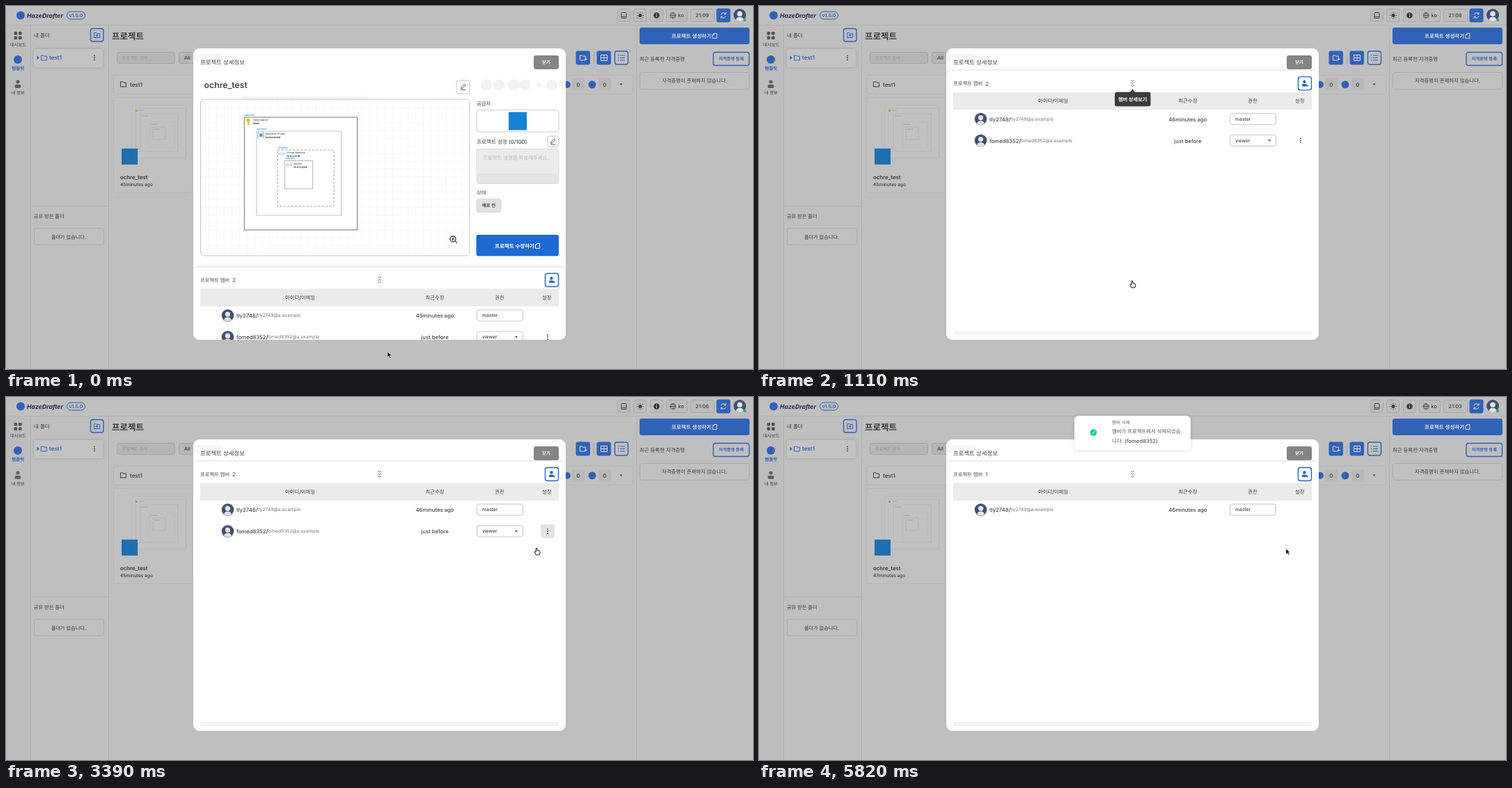
Recreate the animation shown at these times as an HTML page. Size 1073x522 px, loop 5.85 s.

```html
<!DOCTYPE html>
<html lang="ko">
<head>
<meta charset="utf-8">
<title>Project members</title>
<style>
html, body { margin: 0; width: 100%; height: 100%; overflow: hidden; background: #bfbfbf; }
svg { display: block; font-family: Inter, "Noto Sans CJK KR", "Noto Sans CJK", sans-serif; text-rendering: geometricPrecision; }
</style>
</head>
<body>
<svg id="stage" width="1073" height="522" viewBox="0 0 1073 522"></svg>
<script>
const LOOP = 5850;
const BLUE = '#1e69d2', EDGE_BLUE = '#2463bf', DIM_BLUE = '#3062b8', INK = '#444', DIM_INK = '#3a3a3a', LINE = '#a9a9a9';
const HANDLE = 'fomed8352';

const $ = id => document.getElementById(id);
const rect = (x, y, w, h, fill = 'none', stroke = 'none', r = 0, extra = '') =>
  `<rect x="${x}" y="${y}" width="${w}" height="${h}" rx="${r}" fill="${fill}" stroke="${stroke}" ${extra}/>`;
const circle = (x, y, r, fill, extra = '') => `<circle cx="${x}" cy="${y}" r="${r}" fill="${fill}" ${extra}/>`;
const line = (d, stroke, width = 1, extra = '') =>
  `<path d="${d}" fill="none" stroke="${stroke}" stroke-width="${width}" ${extra}/>`;
// y is the vertical centre of the text
const text = (x, y, s, size, fill = INK, weight = 500, extra = '') =>
  `<text x="${x}" y="${y + size * .36}" font-size="${size}" fill="${fill}" font-weight="${weight}" ${extra}>${s}</text>`;
const mid = (x, y, s, size, fill, weight, extra = '') =>
  text(x, y, s, size, fill, weight, 'text-anchor="middle" ' + extra);
const group = (id, body, extra = '') => `<g id="${id}" ${extra}>${body}</g>`;
const at = (x, y, body) => `<g transform="translate(${x} ${y})">${body}</g>`;

const folder = (x, y, c) => at(x, y, line('M-4-3.5H-1L0-2.3H4V3.5H-4Z', c));
const dots = (x, y, c) => [-3, 0, 3].map(d => circle(x, y + d, .9, c)).join('');
const pencil = (x, y) => at(x, y, line('M-3 3L-2.4.8L2-3.5L3.6-2L-.8 2.4ZM-3.5 4.6H4', '#444', .9));
const caret = (x, y, c) => `<path d="M${x - 2} ${y - 1}h4l-2 2.4z" fill="${c}"/>`;
const doc = (x, y, c) => at(x, y, line('M-1-3.5H3V3.5H-3V-1.5ZM-3-1.5H-1V-3.5', c));
const avatar = (x, y, r) => at(x, y, circle(0, 0, r, '#43516f') + circle(0, -r * .2, r * .42, '#dfe3ea')
  + `<path d="M${-r * .62} ${r * .78}Q${-r * .5} ${r * .3} 0 ${r * .3}T${r * .62} ${r * .78}Q0 ${r * 1.2} ${-r * .62} ${r * .78}Z" fill="#dfe3ea"/>`);

function topBar() {
  const box = (x, w) => rect(x + .5, 4.5, w, 18, '#bcbcbc', '#a6a6a6', 3);
  return line('M0 27.5H1073', '#b2b2b2')
    + circle(21, 13.5, 6, DIM_BLUE)
    + text(30, 13.5, 'HazeDrafter', 8.7, '#20304f', 700, 'font-style="italic"')
    + rect(87.5, 8, 26, 11, 'none', DIM_BLUE, 5.5) + mid(100.5, 13.5, 'v1.5.0', 7, DIM_BLUE, 600)
    + box(878, 18) + box(901, 18) + box(925, 18) + box(948, 30) + box(983, 34)
    + rect(884, 9.5, 7, 8, 'none', DIM_INK, 1) + line('M884 15.3H891', DIM_INK)
    + circle(911, 13.5, 2.5, DIM_INK)
    + line('M911 8.7V10M911 17V18.3M906.2 13.5H907.5M914.5 13.5H915.8M907.6 10.1l.9.9M913.5 16l.9.9M907.6 16.9l.9-.9M913.5 11l.9-.9', DIM_INK)
    + circle(934.5, 13.5, 4.3, DIM_INK) + line('M934.5 13V16M934.5 10.8V12', '#ccc')
    + circle(958, 13.5, 4, 'none', `stroke="${DIM_INK}" stroke-width=".8"`)
    + line('M954 13.5H962M958 9.5Q954.5 13.5 958 17.5Q961.5 13.5 958 9.5', DIM_INK, .7)
    + text(965.5, 13.5, 'ko', 7.3, DIM_INK) + mid(1000, 13.5, '', 7.4, DIM_INK, 500, 'id="clock"')
    + rect(1020.5, 3.5, 20, 20, DIM_BLUE, 'none', 3)
    + line('M1027 12.5A3.7 3.7 0 0 1 1033.7 11.5M1034 14.5A3.7 3.7 0 0 1 1027.3 15.5M1034 9V11.8H1031.4M1027 18V15.2H1029.6', '#ddd')
    + avatar(1054, 13, 9) + circle(1061, 20, 2.2, '#2fae87');
}

function sidePanels() {
  const tile = (x, y) => rect(x, y, 4.6, 4.6, '#505050', 'none', 1);
  return rect(0, 28, 35, 494, '#bcbcbc') + line('M35.5 28V522M147.5 28V522M905.5 28V522', '#b0b0b0')
    + tile(11.5, 37) + tile(18, 37) + tile(11.5, 43.5) + tile(18, 43.5)
    + mid(17.5, 55.5, '대시보드', 6.3, DIM_INK)
    + circle(17, 77, 6, DIM_BLUE) + mid(17.3, 90, '템플릿', 6.5, DIM_BLUE, 700)
    + circle(17, 109, 2.6, '#5f5f5f') + rect(12.5, 113, 9, 5, '#5f5f5f', 'none', 2.2)
    + mid(17.3, 124.5, '내 정보', 6.3, DIM_INK)
    + text(40, 42, '내 폴더', 7.5, DIM_INK)
    + rect(121.5, 32.5, 18.5, 18.5, '#b9bdc5', DIM_BLUE, 3, 'stroke-width="1.4"')
    + folder(130.7, 42, DIM_BLUE) + line('M128.7 42.3h4M130.7 40.3v4', DIM_BLUE)
    + rect(40, 62, 99, 26, '#c3c3c3', 'none', 3, 'filter="url(#soft)"')
    + `<path d="M44.5 71.5l3.5 3l-3.5 3z" fill="${DIM_BLUE}"/>` + folder(54.5, 74.5, DIM_BLUE)
    + text(62, 74.5, 'test1', 8, DIM_BLUE, 600) + dots(127, 74.5, DIM_INK)
    + line('M36 287.5H147', '#b0b0b0') + text(40, 302, '공유 받은 폴더', 7.2, DIM_INK)
    + rect(40.5, 319.5, 100, 24, '#c0c0c0', LINE, 3) + mid(90, 332, '폴더가 없습니다.', 7.15, DIM_INK)
    + rect(910, 31, 158, 24, DIM_BLUE, 'none', 3)
    + text(956, 43, '프로젝트 생성하기', 7.5, '#ddd', 600) + doc(1018, 43, '#ddd')
    + text(910, 76, '최근 등록한 자격증명', 7.4, DIM_INK)
    + rect(1016, 66.5, 51.5, 19, 'none', DIM_BLUE, 3, 'stroke-width="1.4"')
    + mid(1041.8, 76, '자격증명 등록', 6.3, DIM_BLUE, 700)
    + rect(910.5, 95.5, 157, 24, '#c0c0c0', LINE, 3)
    + mid(989, 107.5, '자격증명이 존재하지 않습니다.', 7.35, DIM_INK);
}

function projectList() {
  const frame = (x, y, w, h, extra = '') => rect(x, y, w, h, 'none', '#a5a9ae', 0, 'stroke-width=".5" ' + extra);
  return text(152, 43, '프로젝트', 12.5, DIM_INK, 700)
    + rect(159.5, 66.5, 83, 16, '#b5b5b5', '#a2a2a2', 3) + text(167, 74.5, '프로젝트 검색', 6.2, '#929292')
    + rect(248.5, 66.5, 40, 16, '#b5b5b5', '#a2a2a2', 3) + text(256, 74.5, 'All', 7.2, DIM_INK)
    + rect(818.5, 64.5, 20.5, 20, DIM_BLUE, 'none', 3) + folder(828.5, 74.5, '#ddd') + line('M831 76.5h4', '#ddd')
    + line('M844.5 66V83', '#a6a6a6')
    + rect(848.5, 64.5, 20.5, 20, DIM_BLUE, 'none', 3)
    + line('M854.5 70.5H863.5V78.5H854.5ZM859 70.5V78.5M854.5 74.5H863.5', '#ddd')
    + rect(874.5, 65, 19, 19, '#bfbfbf', DIM_BLUE, 3, 'stroke-width="1.4"')
    + line('M879 71H880.5M882 71H889M879 74.5H880.5M882 74.5H889M879 78H880.5M882 78H889', DIM_BLUE)
    + rect(154.5, 99.5, 746, 27, '#c0c0c0', '#b5b5b5', 3)
    + folder(168.5, 112.5, DIM_INK) + text(178, 113, 'test1', 8, DIM_INK)
    + circle(806, 113, 5, DIM_BLUE) + circle(842, 113, 5.5, DIM_BLUE)
    + [822, 860].map(x => rect(x - 9, 104, 18, 17, '#b7b7b7', 'none', 3) + mid(x, 113, '0', 7.5, DIM_INK)).join('')
    + caret(883.5, 112.5, DIM_INK)
    + rect(154.5, 131.5, 113, 137, '#c0c0c0', '#b7b7b7', 3)
    + rect(181, 143, 78, 77, '#c2c2c2', '#b5b5b5', 2, 'stroke-width=".7"')
    + frame(186, 147, 72, 71) + frame(193, 155, 54, 54) + frame(206, 167, 36, 36, 'stroke-dasharray="2 1.5"') + frame(211, 174, 18, 18)
    + rect(186, 149, 3, 3, '#b59a35') + line('M191 150h7M195 158h9M208 170h9M213 177h8', '#999', .8)
    + rect(166, 205, 23, 23, '#1b6fb3')
    + text(164, 246, 'ochre_test', 7.8, DIM_INK, 600) + text(164, 257, '', 6.6, DIM_INK, 500, 'id="cardAgo"');
}

function diagram() {
  const arrows = (x, y) => line(`M${x - 2} ${y - 2}l-2 2l2 2M${x + 2} ${y - 2}l2 2l-2 2`, '#3aa0dc', .9)
    + circle(x - 1, y, .6, '#6bb52d') + circle(x + 1, y, .6, '#6bb52d');
  const node = (x, y, id, tx, name, value) => text(x, y - 3.5, id, 3.2, '#2a90dc', 600)
    + text(tx, y + 4.2, name, 3.6, '#444') + text(tx, y + 8.9, value, 3.5, '#222', 700);
  return rect(279.5, 134, 386.5, 225, '#fff', '#c4c4c4', 6) + rect(280, 135, 385, 223, 'url(#grid)', 'none', 6)
    + rect(342.3, 160, 162.2, 162, '#fff', '#555', 0, 'stroke-width=".8"')
    + rect(360, 180, 121.5, 121, '#fff', '#b5b5b5', 0, 'stroke-width=".8"')
    + rect(390, 207, 81, 81, '#fff', '#98a0c8', 0, 'stroke-dasharray="3.5 2"')
    + rect(400.5, 222.5, 40, 40.5, '#fff', '#a5a5a5', 0, 'stroke-width=".8"')
    + node(342, 160, 's8610556', 355, 'Subscription', 'None')
    + node(360, 180, 'rg731206', 372.5, 'Resource Group', 'koreacentral')
    + node(390, 207, 'vn331652', 403, 'Virtual Network', '10.0.0.0/16')
    + node(400.5, 222.5, 's320662', 413, 'Subnet', '10.0.0.0/24')
    + circle(348, 164.5, 2.7, '#f2bd22') + rect(347, 166, 2, 5, '#f2bd22')
    + line('M363.5 182h-1.5v7h1.5M368.5 182h1.5v7h-1.5', '#999', .9) + rect(364, 183.5, 4.5, 4.5, '#3aa0dc', 'none', 1)
    + arrows(396, 212.5) + arrows(406.5, 228.5)
    + circle(642, 335, 4, 'none', 'stroke="#333" stroke-width="1.3"') + line('M645 338L648 341M640 335H644M642 333V337', '#333', 1.2);
}

function details() {
  return rect(269, 69, 44, 12, '#f7f7f7', 'none', 6) + rect(338, 129, 183, 8, '#f6f6f6', 'none', 4)
    + [690, 708, 729, 746, 784].map(x => circle(x, 113.5, 8, '#f3f3f3')).join('')
    + rect(731, 109, 15, 9, '#f3f3f3') + circle(766, 113, 4, '#f6f6f6') + circle(800, 113, 6, '#f6f6f6')
    + text(284.5, 114, 'ochre_test', 12.3, INK, 600)
    + rect(647, 107, 19, 19, '#fff', '#c4c4c4', 3) + pencil(656.5, 116)
    + diagram()
    + text(676, 140.5, '공급자', 7.4)
    + rect(676, 149.5, 118, 31.5, '#fff', '#ccc', 3) + rect(722, 152.5, 26, 26, '#1583d2')
    + text(676, 195, '프로젝트 설명 (0/100)', 7.6)
    + rect(778, 187, 15.5, 15.5, '#fff', '#c4c4c4', 3) + pencil(785.5, 194.5)
    + rect(676, 205.5, 118, 50, '#ebebeb', '#dcdcdc', 3) + rect(676, 241, 118, 14, '#e4e4e4', 'none', 3)
    + text(685, 218, '프로젝트 설명을 작성해주세요.', 7.4, '#b8b8b8')
    + text(676, 268, '상태', 7.3)
    + rect(676, 277.5, 35, 19, '#e1e1e1', '#d6d6d6', 3) + mid(693.5, 287, '배포 전', 6.4, INK, 600)
    + rect(675.5, 329, 118.5, 30.5, BLUE, 'none', 3)
    + text(702, 345, '프로젝트 수정하기', 7.5, '#fff', 700) + doc(763.5, 345, '#fff');
}

function member(y, name, mail, agoId, role, editable) {
  return circle(318.5, y + .5, 10, '#eceef1') + avatar(318.5, y, 8.7)
    + text(331, y + .5, name + '/', 7.7) + text(361 + (editable ? 14 : 0), y, mail, 6.67, '#777', 400)
    + mid(616, y + .5, 'just before', 7.7, INK, 500, agoId ? `id="${agoId}"` : '')
    + rect(676.5, y - 8, 66, 16, '#fff', '#c4c4c4', 3) + text(684, y, role, 6.8)
    + (editable ? caret(733, y, '#333') + rect(768, y - 10, 20, 20, '#e3e3e3', 'none', 3, 'id="hover"') + dots(778, y, '#444') : '');
}

function sheet() {
  return rect(269, 93, 535, 420, '#fff', 'none', 8, 'filter="url(#soft)"')
    + text(279, 111.5, '프로젝트 멤버', 7.3) + text(325, 111.5, '', 8, '#2d62b8', 500, 'id="count"')
    + line('M534 106.2l2.5 2l2.5-2M534 109.7l2.5 2l2.5-2M534 113.2l2.5 2l2.5-2', BLUE, .9, 'id="chevrons"')
    + rect(774.5, 101.5, 19, 19, '#fff', EDGE_BLUE, 3, 'stroke-width="1.4"')
    + circle(783.5, 108.5, 2.2, EDGE_BLUE) + rect(779.8, 111.7, 7, 3.6, EDGE_BLUE, 'none', 1.8)
    + line('M785.7 114.3h3.2M787.3 112.7v3.2', EDGE_BLUE, .9)
    + rect(279, 123.5, 515, 25.5, '#ebebeb')
    + mid(422.5, 136.5, '아이디/이메일', 7.3) + mid(616, 136.5, '최근수정', 7.3)
    + mid(709, 136.5, '권한', 7.3) + mid(776.7, 136.5, '설정', 7.3)
    + member(162, 'tly2748', 'tly2749@a.example', 'ago', 'master')
    + group('row2', member(193, HANDLE, HANDLE + '@a.example', '', 'viewer', true))
    + rect(279, 467, 515, 6, '#f3f3f3')
    + group('tip', rect(511, 123.5, 51.5, 20.5, '#3b3b3b', 'none', 3)
      + '<path d="M532.5 124l4-4.5l4 4.5z" fill="#3b3b3b"/>' + mid(536.7, 134, '멤버 상세보기', 7.2, '#fff', 600));
}

const toast = rect(453, 27, 167, 49.5, '#fff', 'none', 6, 'filter="url(#soft)"')
  + circle(480.5, 51, 4.8, '#20c997') + line('M478.3 51l1.6 1.6l3-3.2', '#fff')
  + text(507, 36.5, '멤버 삭제', 6.5, '#666') + text(507, 49, '멤버가 프로젝트에서 삭제되었습', 7.35, '#555')
  + text(507, 63, `니다. (${HANDLE})`, 7.6, '#555');

$('stage').innerHTML = `<defs>
  <clipPath id="modalClip">${rect(269, 61, 535, 419, '#fff', 'none', 9)}</clipPath>
  <pattern id="grid" x="280" y="135" width="11" height="11" patternUnits="userSpaceOnUse">
    ${line('M0 .5H11M.5 0V11', '#f0f0f0', .7, 'stroke-dasharray="2 1"')}</pattern>
  <filter id="soft" x="-10%" y="-20%" width="120%" height="140%"><feDropShadow dx="0" dy="0" stdDeviation="2.5" flood-opacity=".18"/></filter>
  </defs>`
  + rect(0, 0, 1073, 522, '#bfbfbf') + topBar() + sidePanels() + projectList()
  + group('modal', rect(269, 61, 535, 419, '#fff') + details() + group('sheet', sheet())
    + text(279, 81, '프로젝트 상세정보', 8.4)
    + rect(758, 71, 36, 20, '#858585', 'none', 3) + mid(776, 81, '닫기', 6.3, '#fff', 600), 'clip-path="url(#modalClip)"')
  + group('toast', toast)
  + group('cursor', `<path id="arrow" d="M0 0V8L1.9 6.3L3.2 9.3L4.6 8.7L3.3 5.8H5.8Z" fill="#000" stroke="#fff" stroke-width=".5"/>
    <path id="hand" transform="translate(1 5)" d="M-2-4.3Q-1.1-5.3-.2-4.3V-1.5Q3.8-1.5 3.8.8V3L2.8 5H-1.8L-4.2.8Q-4-.6-2 .9Z" fill="#fff" stroke="#111" stroke-width="1"/>`);

// Time, x, y of the pointer tip
const PATH = [[30, 548, 497], [480, 536, 395], [1320, 536, 395], [2160, 783, 196], [2310, 777, 193], [2520, 777, 193],
  [2850, 765, 217], [3500, 762, 217], [3800, 760.5, 213.5], [5580, 760.5, 213.5], [5700, 757, 218]];

const clamp = v => Math.min(1, Math.max(0, v));
const span = (t, start, length) => clamp((t - start) / length);

// CSS "ease": cubic-bezier(.25, .1, .25, 1)
function ease(x) {
  if (x <= 0 || x >= 1) return clamp(x);
  const curve = (u, a, b) => 3 * u * (1 - u) ** 2 * a + 3 * u * u * (1 - u) * b + u ** 3;
  let lo = 0, hi = 1;
  for (let i = 0; i < 20; i++) {
    const m = (lo + hi) / 2;
    if (curve(m, .25, .25) < x) lo = m; else hi = m;
  }
  return curve(lo, .1, 1);
}

function pointer(t) {
  const i = PATH.findIndex(p => p[0] > t);
  if (i === 0) return PATH[0].slice(1);
  if (i < 0) return PATH[PATH.length - 1].slice(1);
  const [t0, x0, y0] = PATH[i - 1], [t1, x1, y1] = PATH[i];
  const u = (t - t0) / (t1 - t0), k = u * u * (3 - 2 * u);
  return [x0 + (x1 - x0) * k, y0 + (y1 - y0) * k];
}

const set = (id, name, value) => $(id).setAttribute(name, value);
const write = (id, s) => { if ($(id).textContent !== s) $(id).textContent = s; };
const show = (id, on) => set(id, 'visibility', on ? 'visible' : 'hidden');

function draw(t) {
  const removed = t >= 3900;
  write('clock', '21:0' + (9 - (t < 840 ? 0 : 1 + Math.floor((t - 840) / 900))));
  write('ago', (t < 840 ? 45 : 46) + 'minutes ago');
  write('cardAgo', (removed ? 47 : 45) + 'minutes ago');
  write('count', removed ? '1' : '2');
  set('row2', 'display', removed ? 'none' : 'inline');
  set('hover', 'opacity', t >= 2070 && t < 3720 ? 1 : 0);

  const raised = ease(span(t, 854, 270));
  set('sheet', 'transform', `translate(0 ${283 * (1 - raised)})`);
  set('chevrons', 'transform', raised < .1 ? 'rotate(180 536.5 110.8)' : '');
  const grey = .5 + .5 * Math.cos((t - 210) / 900 * 2 * Math.PI);
  const mix = (a, b) => Math.round(a + (b - a) * grey);
  set('chevrons', 'stroke', `rgb(${mix(45, 105)},${mix(85, 108)},${mix(190, 120)})`);
  set('tip', 'opacity', span(t, 500, 90) * (1 - span(t, 1380, 120)));

  const arrived = ease(span(t, 4220, 270));
  set('toast', 'transform', `translate(0 ${-66 * (1 - arrived)})`);
  set('toast', 'opacity', Math.sqrt(arrived));

  const [x, y] = pointer(t);
  const hand = (t >= 450 && t < 1380) || (t >= 2070 && t < 3720);
  set('cursor', 'transform', `translate(${x} ${y})`);
  show('hand', hand);
  show('arrow', !hand);
}

const start = performance.now();
function tick(now) {
  draw(Math.max(0, now - start) % LOOP);
  requestAnimationFrame(tick);
}
draw(0);
requestAnimationFrame(tick);
</script>
</body>
</html>
```
